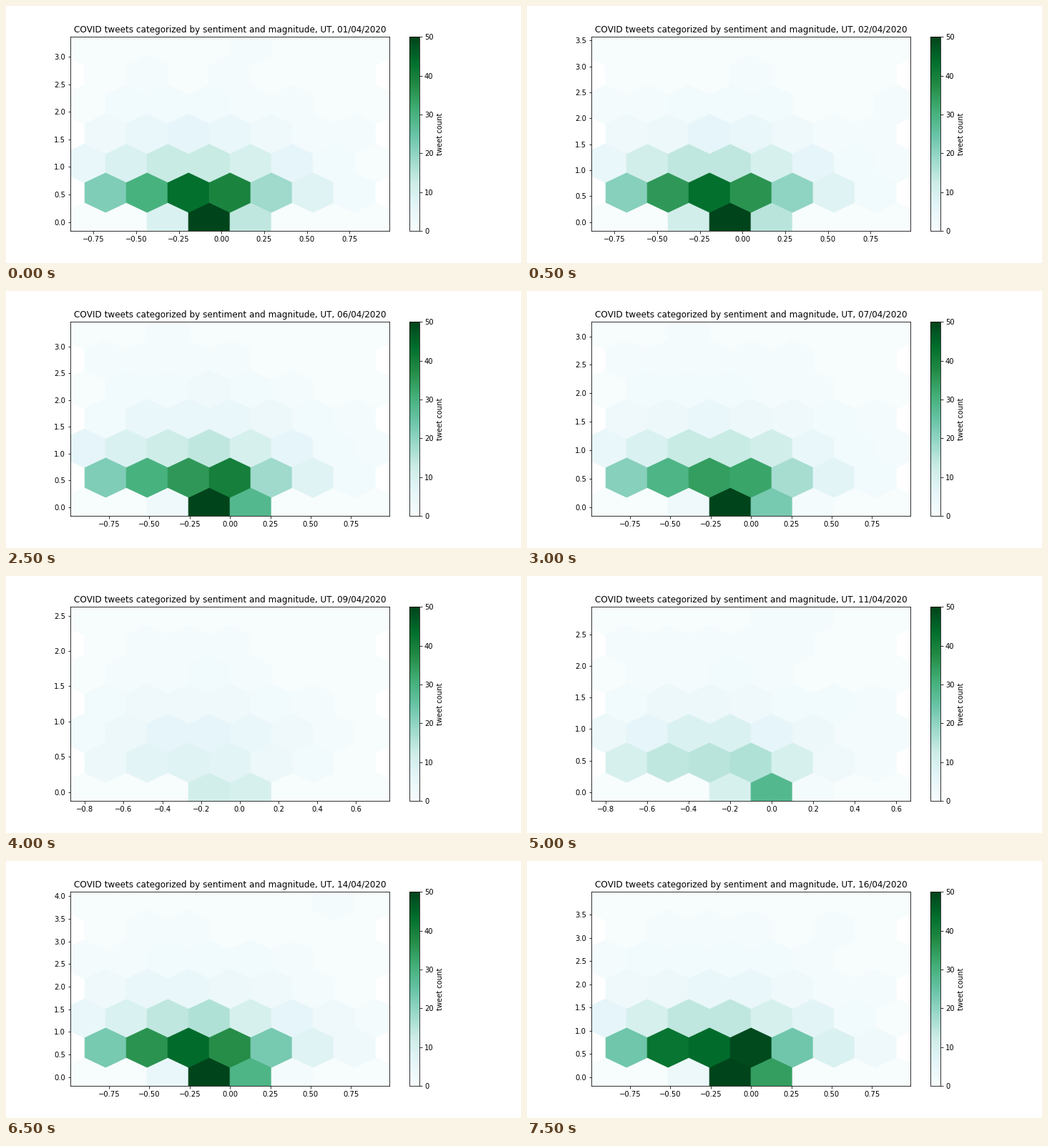
A matplotlib script for the animation above (8 s loop, 720 by 360 pixels).

```python
import numpy as np
import matplotlib.pyplot as plt
from matplotlib.animation import FuncAnimation
from matplotlib.cm import ScalarMappable
from matplotlib.colors import Normalize

plt.rcParams.update({
    "font.family": "DejaVu Sans",
    "font.size": 10,
    "text.kerning_factor": 6,
    "figure.subplot.bottom": 0.125,
})

NX, NY = 7, 3
DAYS = 16
TOP_COUNT = 50

# Key days: sentiment from, sentiment to, highest magnitude, tweet volume
KEYS = {
    1: (-.8, .9, 3.2, 1),
    4: (-.9, .9, 3.7, 1.1),
    7: (-.9, .9, 3.1, .9),
    9: (-.8, .7, 2.5, .2),
    11: (-.8, .6, 2.8, .42),
    13: (-.9, .9, 3.9, 1),
    16: (-.9, .9, 3.8, 1.2),
}

# Column and row of each hexagon; odd rows sit half a cell to the right.
COL, ROW = np.array([(i + r % 2 / 2, r) for r in range(2 * NY + 1)
                     for i in range(NX + 1 - r % 2)]).T


def state(day):
    """Extent and volume, moving evenly between key days."""
    x0, x1, top, volume = (np.interp(day, list(KEYS), track)
                           for track in zip(*KEYS.values()))
    return round(x0, 1), round(x1, 1), round(top, 1), volume


def bump(center, width):
    return np.exp(-((COL - center) / width) ** 2 / 2)


def counts(day, zero, volume):
    """Tweets per hexagon, with `zero` the column of neutral sentiment."""
    rng = np.random.default_rng(day)
    neutral = 80 * bump(zero - .25, .51)
    # Negative-leaning cloud that thins out with magnitude
    cloud = 36 * np.exp(-.95 * (ROW - 1)) * bump(2.3 + .3 * (ROW > 1), 1.8)
    cloud += 10 * bump(zero, .7) * (ROW == 1)
    mean = np.where(ROW == 0, neutral, cloud)
    # Strong feelings vary less with the daily volume
    mean = mean * volume ** (1 / np.maximum(ROW, 1))
    return np.floor(mean * rng.uniform(.9, 1.1, mean.size) + rng.random(mean.size))


fig, ax = plt.subplots(figsize=(10, 5), dpi=72)
norm = Normalize(0, TOP_COUNT)
fig.colorbar(ScalarMappable(norm, "BuGn"), ax=ax, label="tweet count")


def draw(i):
    day = i + 1
    x0, x1, top, volume = state(day)
    span = x1 - x0
    ax.clear()
    ax.hexbin(x0 + span * COL / NX, top * ROW / (2 * NY),
              C=counts(day, -x0 / span * NX, volume), reduce_C_function=np.sum,
              gridsize=(NX, NY), extent=(x0, x1, 0, top),
              cmap="BuGn", vmin=0, vmax=TOP_COUNT)
    ax.set_xlim(x0 - .05 * span, x1 + .05 * span)
    ax.set_ylim(-.05 * top, 1.05 * top)
    ax.set_title("COVID tweets categorized by sentiment and magnitude, "
                 f"UT, {day:02d}/04/2020")


anim = FuncAnimation(fig, draw, frames=DAYS, interval=500, repeat=True, repeat_delay=0)
plt.show()
```
